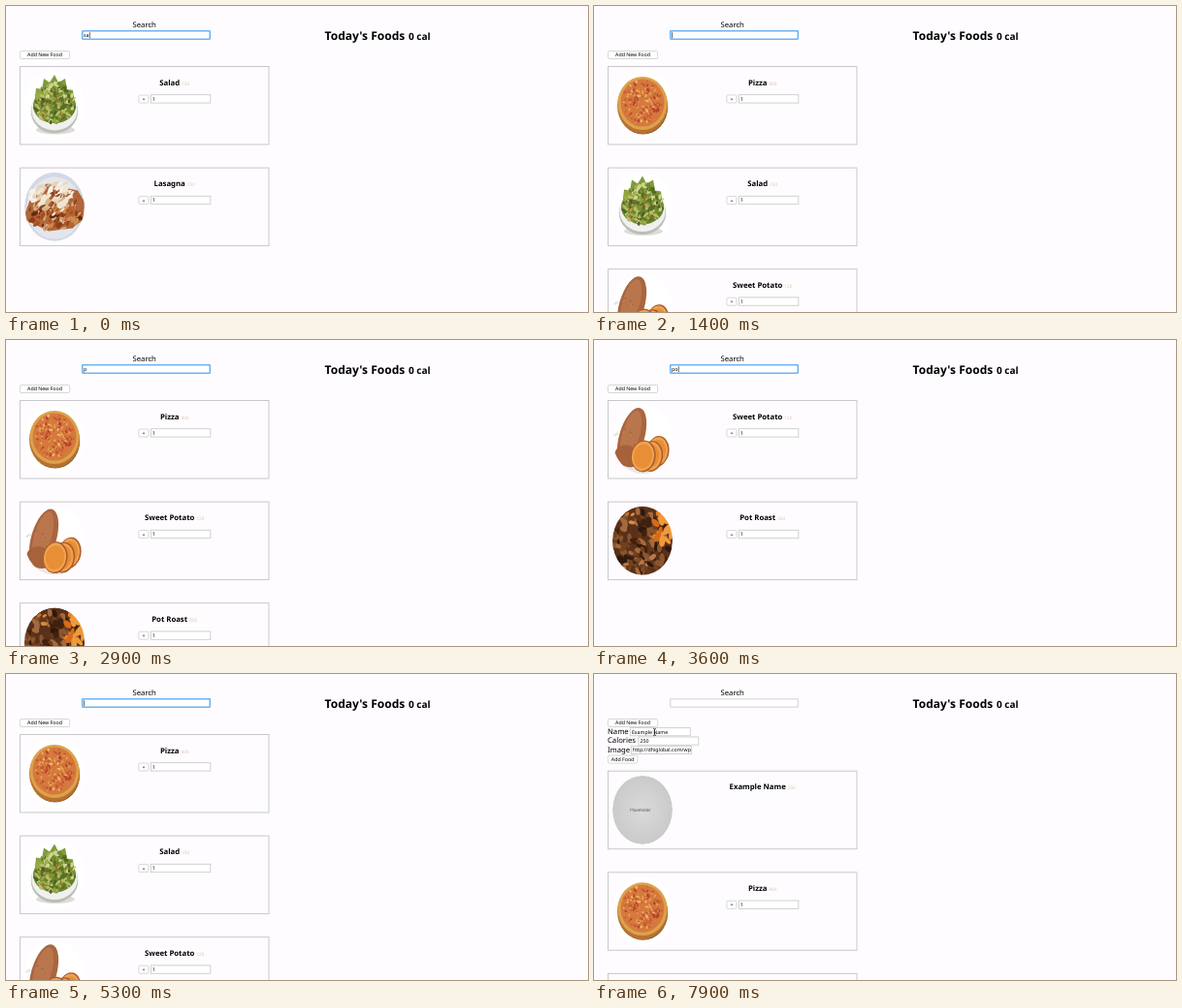
Recreate the animation shown at these times as an HTML page. Size 600 by 316 pixels, loop 8000 ms.

```html
<!DOCTYPE html>
<html lang="en">
<head>
<meta charset="utf-8">
<title>Food search</title>
<style>
html, body { margin: 0; width: 100%; height: 100%; overflow: hidden; background: #fefcff; }
svg { display: block; width: 600px; height: 316px; }
text { font-family: "Noto Sans", "Open Sans", sans-serif; font-size: 7.7px; font-weight: 500; fill: #000; text-rendering: geometricPrecision; white-space: pre; }
.bold { font-weight: 700; }
.title { font-size: 7.75px; text-anchor: middle; }
.cal { font-size: 4.7px; font-weight: 400; fill: #e6c5a8; }
.small { font-size: 5.25px; }
.mid { text-anchor: middle; }
.box { fill: #fff; stroke: #ccc; stroke-width: .9; }
.btn { fill: #fff; stroke: #cecece; stroke-width: .8; }
.card { fill: none; stroke: #c9c8c9; }
</style>
</head>
<body>
<svg viewBox="0 0 600 316">
  <defs>
    <clipPath id="oval"><ellipse cx="50" cy="40.7" rx="31" ry="35.5"/></clipPath>
    <filter id="soft"><feGaussianBlur stdDeviation=".7"/></filter>
    <radialGradient id="grey"><stop offset="0" stop-color="#dadada"/><stop offset="1" stop-color="#cbcacb"/></radialGradient>
    <linearGradient id="blue" x2="0" y2="1"><stop offset="0" stop-color="#3f93f8"/><stop offset="1" stop-color="#0a62ee"/></linearGradient>
  </defs>
  <rect width="600" height="316" fill="#fefcff"/>
  <text class="mid" x="142.7" y="21.7">Search</text>
  <rect class="box" x="78.8" y="25.9" width="131.4" height="8.2"/>
  <g id="focus">
    <rect x="78.7" y="25.7" width="131.6" height="8.6" rx="1" fill="#fff" stroke="#6db3f2" stroke-width="1.6"/>
    <text id="query" class="small" x="80.1" y="32"></text>
    <rect id="caret" y="27.2" width=".7" height="6" fill="#222"/>
  </g>
  <text class="bold" x="328.6" y="35" style="font-size:12px">Today's Foods <tspan dx=".7" style="font-size:10px">0 cal</tspan></text>
  <rect id="add" class="btn" x="14.4" y="46.5" width="51.2" height="8" rx="1.5"/>
  <text class="small mid" x="40" y="52.4">Add New Food</text>
  <g id="form"></g>
  <g id="list"></g>
  <path id="arrow" d="M0 0V7.2L1.7 5.7L2.8 8.2L4 7.7L2.9 5.2H5.2Z" fill="#000" stroke="#fff" stroke-width=".5"/>
  <path id="beam" d="M-1.3 -3.5Q0 -3.5 0 -2.6Q0 -3.5 1.3 -3.5M0 -2.6V2.6M-1.3 3.5Q0 3.5 0 2.6Q0 3.5 1.3 3.5" fill="none" stroke="#111" stroke-width=".8"/>
</svg>
<script>
const LOOP = 8000, PITCH = 104.6, PRESS = 6700, OPEN = 6800;
const $ = id => document.getElementById(id);
const show = (el, on) => el.setAttribute('display', on ? 'inline' : 'none');
const place = (el, x, y) => el.setAttribute('transform', `translate(${x} ${y})`);

function random(seed) {
  return () => (seed = (seed * 16807) % 2147483647) / 2147483647;
}

const oval = (x, y, rx, ry, fill, turn = 0) =>
  `<ellipse cx="${x}" cy="${y}" rx="${rx}" ry="${ry}" fill="${fill}" transform="rotate(${turn} ${x} ${y})"/>`;

// Scatter n small ovals over an elliptical area, turned within spread degrees of lean.
function scatter(seed, n, cx, cy, rx, ry, size, colors, lean = 0, spread = 180) {
  const rnd = random(seed * 7919);
  let out = '';
  for (let i = 0; i < n; i++) {
    const a = rnd() * 2 * Math.PI, r = Math.sqrt(rnd());
    const s = size * (.6 + .8 * rnd());
    const fill = colors[Math.floor(rnd() * colors.length)];
    out += oval((cx + rx * r * Math.cos(a)).toFixed(1), (cy + ry * r * Math.sin(a)).toFixed(1),
      s.toFixed(1), (s * (.3 + .4 * rnd())).toFixed(1), fill, Math.round(lean + (rnd() - .5) * spread));
  }
  return out;
}

const pizza = () =>
  oval(50.5, 43, 25.5, 27.5, '#80502b') + oval(50, 41, 26, 29, '#b8712f') +
  oval(50, 38.5, 25.5, 27.5, '#dda14c') + oval(50, 38, 22.5, 24.5, '#d5793c') +
  scatter(11, 110, 50, 38, 21, 23, 1.7, ['#e4994f', '#c95a34', '#eeb866', '#d87842']) +
  scatter(29, 45, 50, 38, 19.5, 21.5, 1.8, ['#b8432e', '#c5563a']);

const salad = () =>
  oval(51, 66, 20, 4.5, '#dedddc') + oval(50, 47, 24.3, 22.5, '#bdbdb8') +
  oval(50, 45, 23.7, 21.5, '#f0f0ee') + oval(50, 41, 22, 18, '#66802e') +
  '<path d="M29 42L31 23L37 24L39 13L45 17L50 9L54 17L61 13L63 24L69 25L71 42Z" fill="#809a3c"/>' +
  scatter(7, 190, 50, 38, 20.5, 20, 2.9,
    ['#6f8a2c', '#8ca43c', '#b5bf68', '#4a6420', '#9cae48', '#7b9333', '#d0d38f', '#5b6d25'], 80, 150) +
  scatter(31, 22, 50, 42, 18, 15, 1.7, ['#b0713c', '#c99a58', '#5d4a22']);

const potato = () =>
  oval(51, 72, 27, 4, '#ece6e3') +
  oval(39, 38, 13, 31, '#a9653f', 16) + oval(38, 36, 9, 26, '#b9754c', 16) +
  scatter(17, 16, 38, 37, 9, 24, 1, ['#94532f', '#c78961']) +
  oval(35, 58, 14, 11, '#a7613b', 20) +
  [[66, 53, 11.5, 16], [59, 58, 12, 16], [51, 58, 12.5, 16.5]].map(([x, y, rx, ry]) =>
    oval(x, y, rx, ry, '#a9592d', 8) + oval(x - .5, y, rx - 1, ry - 1.2, '#f0a24e', 8) +
    oval(x - .5, y, rx - 3, ry - 4, '#e78e36', 8)).join('') +
  '<path d="M20 36l4-3 2 2-5 3z" fill="#e8e5e7"/>';

const roast = () =>
  oval(50, 41, 31, 36, '#593019') +
  scatter(43, 130, 49, 43, 29, 33, 4.2, ['#71411f', '#8b552f', '#40210f', '#a46a3e', '#633719', '#2f180c'], 60, 90) +
  scatter(5, 22, 70, 25, 12, 18, 5, ['#e68126', '#d86b18', '#f09a3b']) +
  scatter(9, 7, 33, 16, 13, 8, 3.6, ['#cb7028', '#dc8a3b', '#6d762e']) +
  scatter(19, 12, 45, 63, 25, 9, 3, ['#b47a4c', '#7e4928']);

const lasagna = () =>
  oval(50, 41, 31, 36, '#d3d9e4') + oval(50, 42, 28.5, 32, '#e4e6ec') +
  '<path d="M20 47L27 27L42 17L74 24L81 36L80 54L68 63L44 66L21 55Z" fill="#b0663a"/>' +
  scatter(23, 120, 50, 47, 28, 17, 3, ['#8e3d1a', '#b9602c', '#cf8a4c', '#5f2a14', '#d9b08a', '#a34c20'], -50, 80) +
  scatter(3, 75, 48, 28, 24, 12, 3.6, ['#efe6d6', '#e6d5ba', '#f8f3ea', '#d9b587'], -45, 60) +
  scatter(37, 26, 55, 36, 22, 13, 2.4, ['#8a4220', '#b4632e', '#f1e6d2'], -45, 50);

// A square picture squeezed into the oval frame.
const placeholder = () =>
  `<g transform="translate(50 40.7) scale(1 1.145)"><circle r="31" fill="url(#grey)"/>
   <text class="mid" x="-2.3" y="1.5" style="font:4px 'Liberation Sans',sans-serif;fill:#555">Placeholder</text></g>`;

const foods = [
  { name: 'Example Name', cal: 250, draw: placeholder, draft: true },
  { name: 'Pizza', cal: 400, draw: pizza },
  { name: 'Salad', cal: 150, draw: salad },
  { name: 'Sweet Potato', cal: 120, draw: potato },
  { name: 'Pot Roast', cal: 350, draw: roast },
  { name: 'Lasagna', cal: 750, draw: lasagna }
];

const quantity = `<rect class="btn" x="136.9" y="30" width="10" height="8" rx="1"/>
  <text class="small mid" x="141.9" y="36">+</text>
  <rect class="box" x="149.3" y="29.7" width="61.5" height="8.4"/>
  <text class="small" x="150.8" y="35.9">1</text>`;

$('list').innerHTML = foods.map(f => `<g>
  <rect class="card" x="14.5" y=".5" width="256.5" height="80.5"/>
  <g clip-path="url(#oval)"><rect x="19" y="5" width="62" height="72" fill="#fff"/>
    <g ${f.draft ? '' : 'filter="url(#soft)"'}>${f.draw()}</g></g>
  <text class="bold title" x="173.7" y="19.8">${f.name} <tspan class="cal">${f.cal}</tspan></text>
  ${f.draft ? '' : quantity}</g>`).join('');
foods.forEach((f, i) => f.el = $('list').children[i]);

const fields = [['Name', 'Example Name', 37.3], ['Calories', '250', 45.8], ['Image', 'http://dhiglobal.com/wp', 38.3]];
$('form').innerHTML = fields.map(([label, value, x], i) => {
  const y = 55.6 + i * 9.4;
  return `<text x="14" y="${y + 6.4}">${label}</text>
    <rect class="box" x="${x}" y="${y}" width="62" height="8.2"/>
    <text class="small" x="${x + 1.6}" y="${y + 6}">${value}</text>`;
}).join('') + `<rect class="btn" x="14.4" y="84.1" width="30.4" height="8" rx="1.5"/>
  <text class="small mid" x="29.6" y="90">Add Food</text>`;

const typing = [[0, 'sa'], [200, 'sal'], [900, 'sa'], [1100, 's'], [1300, ''],
  [2100, 'p'], [3600, 'po'], [4800, 'p'], [5300, '']];
const pointer = [[6300, 76, 40], [6600, 50, 47.5], [7600, 50, 47.5], [7900, 62.5, 60]];

function pointerAt(t) {
  const i = pointer.findIndex(p => p[0] > t);
  if (i < 0) return pointer[pointer.length - 1].slice(1);
  const [t0, x0, y0] = pointer[i - 1], [t1, x1, y1] = pointer[i];
  const k = (t - t0) / (t1 - t0), e = k * k * (3 - 2 * k);
  return [x0 + (x1 - x0) * e, y0 + (y1 - y0) * e];
}

function render(t) {
  const [since, query] = typing.filter(k => k[0] <= t).pop();
  const open = t >= OPEN, pressed = t >= PRESS && !open;

  show($('focus'), t < PRESS);
  $('query').textContent = query;
  $('caret').setAttribute('x', 80.4 + (query ? $('query').getComputedTextLength() : 0));
  show($('caret'), (t - since) % 1000 < 500);

  $('add').style.fill = pressed ? 'url(#blue)' : '';
  $('add').style.stroke = pressed ? '#1764d8' : '';
  show($('form'), open);

  let row = 0;
  for (const f of foods) {
    const on = f.draft ? open : f.name.toLowerCase().includes(query);
    show(f.el, on);
    if (on) place(f.el, 0, (open ? 99.7 : 62) + PITCH * row++);
  }

  const moving = t >= pointer[0][0];
  const [x, y] = moving ? pointerAt(t) : [0, 0];
  const text = open && y > 55.6;
  place($('arrow'), x, y);
  place($('beam'), x, y);
  show($('arrow'), moving && !text);
  show($('beam'), text);
}

function tick() {
  render(performance.now() % LOOP);
  requestAnimationFrame(tick);
}
tick();
</script>
</body>
</html>
```
